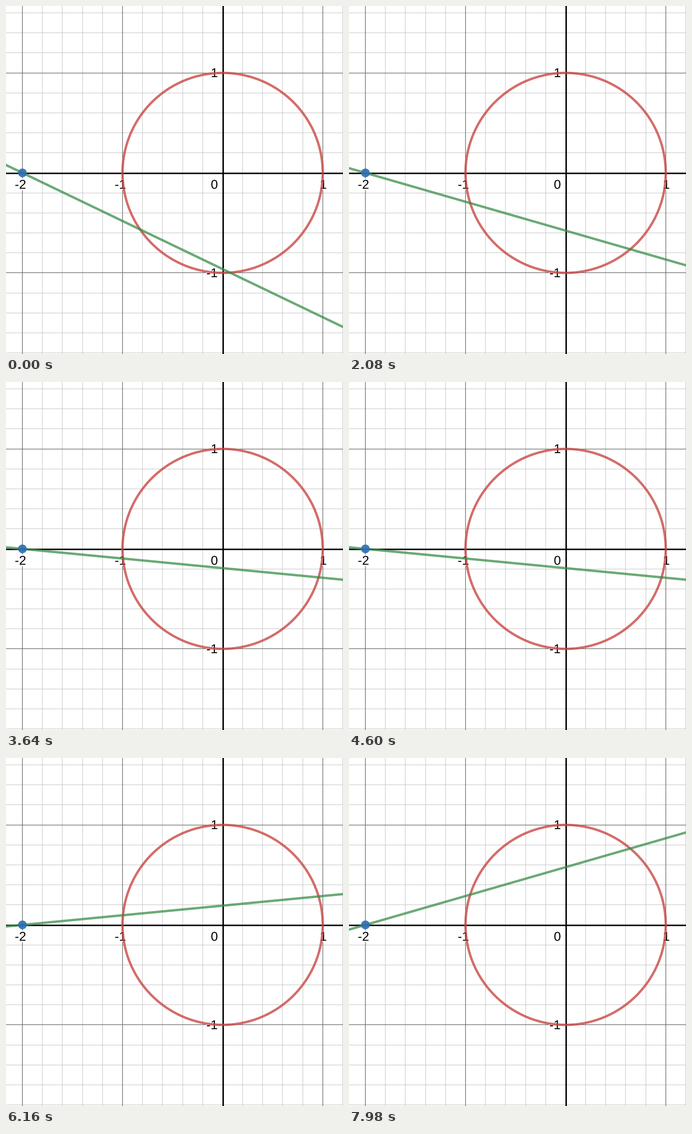
Animation of 710 by 734 pixels, one loop 8 s. Source, as a matplotlib script:

```python
import math

import numpy as np
import matplotlib.pyplot as plt
from matplotlib.animation import FuncAnimation
from matplotlib.collections import LineCollection
from matplotlib.patches import Circle
from matplotlib.patheffects import withStroke

W, H, DPI = 710, 734, 100
PT = 72 / DPI                 # points per pixel
LOOP, STEP = 8000, 40         # ms
OX, OY, UNIT = 456.4, 352.0, 210.9
AXIS_X, AXIS_Y = 457.5, 353.0

# The slope moves up one notch at each of these times (ms).
NOTCH = 1 / (6 * math.sqrt(3))    # six notches make the line tangent
FIRST = -5
TICKS = [840, 1920, 2760, 3640, 4680, 5680, 6560, 7520]

fig = plt.figure(figsize=(W / DPI, H / DPI), dpi=DPI, facecolor="white")
ax = fig.add_axes([0, 0, 1, 1])
ax.set_xlim(0, W)
ax.set_ylim(H, 0)
ax.axis("off")


def add_lines(segments, color, width, z):
    lines = LineCollection(segments, colors=color, linewidths=width * PT, zorder=z)
    lines.set_snap(False)
    ax.add_collection(lines)


def vertical(x):
    return [(x, -5), (x, H + 5)]


def horizontal(y):
    return [(-5, y), (W + 5, y)]


def label(text, x, baseline):
    ax.text(x, baseline, text, family="Liberation Sans", size=27 * PT,
            color="black", ha="left", va="baseline", zorder=4,
            path_effects=[withStroke(linewidth=6 * PT, foreground="white")])


def draw_grid():
    minor, major = [], []
    for i in range(-12, 13):
        if i == 0:
            continue
        group = minor if i % 5 else major
        offset = i * UNIT / 5
        group.append(vertical(math.floor(OX + offset) + 0.5))
        group.append(horizontal(math.floor(OY + offset) + 0.5))
    add_lines(minor, "#c6c6c6", 1.1, 1)
    add_lines(major, "#666666", 1.3, 2)
    add_lines([vertical(AXIS_X), horizontal(AXIS_Y)], "black", 3, 3)


draw_grid()
label("-2", 18.5, 385.5)
label("-1", 229, 385.5)
label("0", 431.5, 385.5)
label("1", 661, 385.5)
label("1", 431.5, 150)
label("-1", 422, 572)

ax.add_patch(Circle((OX, OY), UNIT, fill=False, ec="#c74440", lw=5 * PT,
                    alpha=0.78, zorder=5))
pivot = (OX - 2 * UNIT, OY)
ax.add_patch(Circle(pivot, 9.2, fc="#2d70b3", ec="none", alpha=0.92, zorder=6))

ends = np.array([-20, W + 20])
secant, = ax.plot([], [], color="#388c46", lw=5 * PT, alpha=0.74, zorder=5.5)


def update(frame):
    now = frame * STEP
    slope = NOTCH * (FIRST + sum(now >= t for t in TICKS))
    secant.set_data(ends, pivot[1] - slope * (ends - pivot[0]))
    return (secant,)


update(0)
anim = FuncAnimation(fig, update, frames=LOOP // STEP, interval=STEP,
                     repeat=True, repeat_delay=0, blit=False)
plt.show()
```
